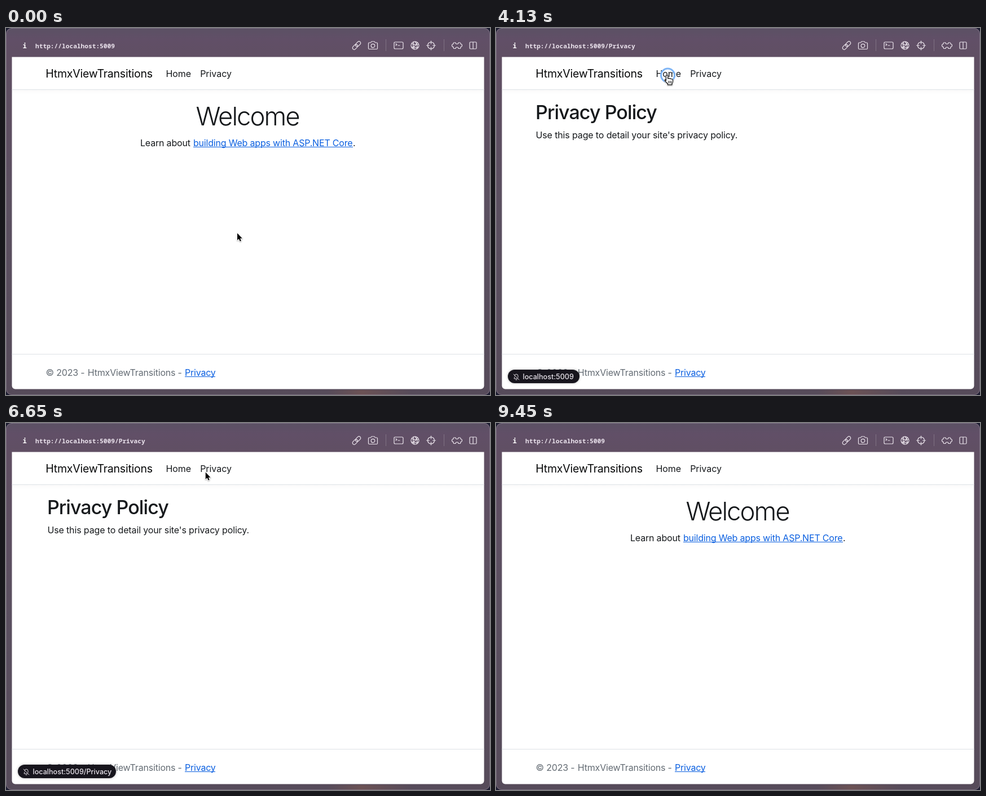
Recreate the animation shown at these times as an HTML page with a canvas. Size 858x652 px, loop 9.66 s.

```html
<!DOCTYPE html>
<html lang="en">
<head>
<meta charset="utf-8">
<title>View transitions</title>
<style>
html, body { margin: 0; width: 100%; height: 100%; overflow: hidden; background: #5d5063; }
canvas { display: block; }
</style>
</head>
<body>
<canvas id="stage" width="858" height="652"></canvas>
<script>
const ctx = document.getElementById('stage').getContext('2d');
const W = 858, H = 652, LOOP = 9660, STEP = 70;
const SANS = 'Inter, "Liberation Sans", sans-serif';
const MONO = '"Noto Sans Mono", "DejaVu Sans Mono", monospace';
const INK = '#15181b', LINK = '#0a5fe0', LINE = '#dee2e6';

// Times at which the page content is exchanged
const swaps = [
  { at: 2774, from: 'home', to: 'privacy' },
  { at: 4290, from: 'privacy', to: 'home' },
  { at: 6185, from: 'home', to: 'privacy' },
  { at: 8010, from: 'privacy', to: 'home' },
];
const clicks = [2610, 4130, 6020, 7850];
const handTimes = [[2170, 2774], [3570, 4290], [5950, 6185], [7070, 8010]];
const hints = [
  { from: 2870, to: 4130, text: 'localhost:5009/Privacy', width: 174 },
  { from: 4130, to: 5180, text: 'localhost:5009', width: 127 },
  { from: 6300, to: 7350, text: 'localhost:5009/Privacy', width: 174 },
  { from: 7350, to: 8470, text: 'localhost:5009', width: 127 },
];
// Pointer stops: time, x, y
const stops = [
  [0, 409, 363], [770, 409, 363], [1190, 376, 366], [1680, 376, 366],
  [2240, 382, 77], [2590, 381, 76], [3290, 381, 76], [3570, 303, 84],
  [5110, 303, 84], [5320, 308, 112], [5530, 304, 118], [5810, 304, 118],
  [5950, 373, 87], [6580, 373, 87], [6790, 295, 83], [7280, 295, 83],
  [7560, 295, 84], [8330, 295, 84], [8610, 300, -24], [LOOP, 300, -24],
];

const clamp = v => Math.min(1, Math.max(0, v));
const mix = (a, b, k) => a + (b - a) * k;
const within = (t, [a, b]) => t >= a && t < b;

function bezier(x1, y1, x2, y2) {
  const axis = (a, b, s) => 3 * a * s * (1 - s) ** 2 + 3 * b * s * s * (1 - s) + s ** 3;
  return x => {
    x = clamp(x);
    let lo = 0, hi = 1;
    for (let i = 0; i < 24; i++) {
      const mid = (lo + hi) / 2;
      if (axis(x1, x2, mid) < x) lo = mid; else hi = mid;
    }
    return axis(y1, y2, (lo + hi) / 2);
  };
}
const slideEase = bezier(0.4, 0, 0.2, 1);
const fadeOut = bezier(0.4, 0, 1, 1);
const fadeIn = bezier(0, 0, 0.2, 1);

function text(str, x, y, { size = 16, weight = 400, color = INK, font = SANS, track = -0.012, align = 'left' } = {}) {
  ctx.font = `${weight} ${size}px ${font}`;
  ctx.letterSpacing = `${track * size}px`;
  ctx.textAlign = align;
  ctx.fillStyle = color;
  ctx.fillText(str, x, y);
}

function rect(x, y, w, h, color) {
  ctx.fillStyle = color;
  ctx.fillRect(x, y, w, h);
}

function rounded(x, y, w, h, r) {
  ctx.beginPath();
  ctx.roundRect(x, y, w, h, r);
}

function link(str, x, y, width) {
  text(str, x, y, { color: LINK });
  rect(x, Math.floor(y) + 2, width, 1, LINK);
}

function strokePath(d, x, y) {
  ctx.save();
  ctx.translate(x, y);
  ctx.stroke(new Path2D(d));
  ctx.restore();
}

function drawFrame() {
  rect(0, 0, W, H, '#1c1c30');
  rounded(0, 0, W, H, 10);
  const shade = ctx.createLinearGradient(0, 0, 0, H);
  shade.addColorStop(0, '#5b5164');
  shade.addColorStop(0.03, '#614f67');
  shade.addColorStop(0.08, '#604f63');
  shade.addColorStop(0.5, '#5b5060');
  shade.addColorStop(1, '#564b5a');
  ctx.fillStyle = shade;
  ctx.fill();
  const glow = ctx.createLinearGradient(570, 0, 720, 0);
  glow.addColorStop(0, 'rgba(116,84,82,0)');
  glow.addColorStop(0.4, 'rgba(116,84,82,.7)');
  glow.addColorStop(1, 'rgba(116,84,82,0)');
  rect(570, 643, 150, 9, glow);
  rounded(0.5, 0.5, W - 1, H - 1, 10);
  ctx.strokeStyle = 'rgba(160,148,165,.5)';
  ctx.lineWidth = 1;
  ctx.stroke();
}

function drawToolbar(url) {
  const pale = '#ece5ed';
  text('i', 29.5, 35.5, { size: 12.5, weight: 700, color: '#fff', font: MONO, track: 0 });
  text(url, 52, 35.5, { size: 11.2, weight: 600, color: '#ebe3ed', font: MONO, track: 0 });
  rect(673, 20, 1, 21, 'rgba(255,255,255,.2)');
  rect(776, 20, 1, 21, 'rgba(255,255,255,.2)');
  ctx.strokeStyle = pale;
  ctx.lineWidth = 1.2;
  ctx.lineCap = ctx.lineJoin = 'round';

  ctx.save();
  ctx.translate(621.5, 31);
  ctx.rotate(-Math.PI / 4);
  rounded(-9, -3, 10.5, 6, 3);
  ctx.stroke();
  rounded(-1.5, -3, 10.5, 6, 3);
  ctx.stroke();
  ctx.restore();

  strokePath('M-8-3.5Q-8-5-6.5-5H-4L-2.5-7H2.5L4-5H6.5Q8-5 8-3.5V5Q8 6.5 6.5 6.5H-6.5Q-8 6.5-8 5ZM3.3.6A3.3 3.3 0 1 1-3.3.6A3.3 3.3 0 1 1 3.3.6', 650.5, 31);
  strokePath('M-6-6H6Q8-6 8-4V4Q8 6 6 6H-6Q-8 6-8 4V-4Q-8-6-6-6ZM-5-3L-3-1.5L-5 0M-1 0H2', 696, 31);
  strokePath('M7 0A7 7 0 1 1-7 0A7 7 0 1 1 7 0M-6-3.5Q0 0 6.5-2M-6.5 2.5Q0 5 6 3M-2-6.7Q-5 1-1 6.8M0-7Q6-1 3 6.2M-5 5Q1 1 4.5-5.3', 725, 31);
  strokePath('M6 0A6 6 0 1 1-6 0A6 6 0 1 1 6 0M0-8V-3M0 8V3M-8 0H-3M8 0H3', 753.5, 31);
  strokePath('M-5.5-5H-2.5Q-2.5-2.5 0-2.5T2.5-5H5.5Q6.5-5 6.5-3V-2.5Q9-2.5 9 0T6.5 2.5V3Q6.5 5.5 5 5.5H2.5Q2.5 3 0 3T-2.5 5.5H-5Q-6.5 5.5-6.5 3V2.5Q-9 2.5-9 0T-6.5-2.5V-3Q-6.5-5-5.5-5Z', 799.5, 31);
  strokePath('M-4.5-6H4.5Q6-6 6-4.5V4.5Q6 6 4.5 6H-4.5Q-6 6-6 4.5V-4.5Q-6-6-4.5-6ZM0-6V6', 828, 31);
}

const pages = {
  home() {
    text('Welcome', 428, 173, { size: 45.5, weight: 300, track: -0.044, align: 'center' });
    text('Learn about', 238, 209.5);
    link('building Web apps with ASP.NET Core', 332, 209.5, 283);
    text('.', 615, 209.5);
  },
  privacy() {
    text('Privacy Policy', 70, 162, { size: 34, weight: 500, track: -0.027 });
    text("Use this page to detail your site's privacy policy.", 70.5, 196, { track: -0.0085 });
  },
};

function drawPage(name, dx, alpha) {
  if (alpha <= 0) return;
  ctx.save();
  ctx.globalAlpha = alpha;
  ctx.translate(dx, 0);
  pages[name]();
  ctx.restore();
}

function drawContent(t, swap) {
  ctx.save();
  rounded(10.5, 51.5, 837, 590, [0, 0, 6, 6]);
  ctx.fillStyle = '#fff';
  ctx.fill();
  ctx.clip();

  const shadow = ctx.createLinearGradient(0, 110, 0, 118);
  shadow.addColorStop(0, 'rgba(0,0,0,.02)');
  shadow.addColorStop(1, 'rgba(0,0,0,0)');
  rect(10, 110, 838, 8, shadow);
  rect(10, 109, 838, 1, LINE);
  text('HtmxViewTransitions', 70.3, 88, { size: 19.5, color: '#060708' });
  text('Home', 283.4, 86.5, { track: -0.003 });
  text('Privacy', 344.2, 86.5, { track: -0.003 });

  if (swap) {
    const age = t - swap.at, slide = 90 * slideEase(age / 600);
    drawPage(swap.from, -slide, 1 - fadeOut(age / 180));
    drawPage(swap.to, 90 - slide, fadeIn((age - 90) / 420));
  } else {
    drawPage('home', 0, 1);
  }

  rect(10, 579, 838, 1, LINE);
  const muted = { color: '#646c74' };
  text('© 2023 -', 70.5, 617.5, muted);
  text('HtmxViewTransitions -', 144.8, 617.5, muted);
  link('Privacy', 317, 617.5, 54);
  ctx.restore();
}

function drawHint({ text: label, width }) {
  ctx.save();
  ctx.shadowColor = 'rgba(0,0,0,.3)';
  ctx.shadowBlur = 4;
  rounded(21, 607, width, 24, 12);
  ctx.fillStyle = '#17151d';
  ctx.fill();
  ctx.restore();
  ctx.strokeStyle = '#dcd7df';
  ctx.lineWidth = 1;
  strokePath('M-5-5L5 5M-3-2Q-3-5 0-5T3-2V1M-3 0L-4 3H2M-1 5H1', 36, 620);
  text(label, 47.5, 623.7, { size: 12.6, weight: 500, color: '#ebe6ee', track: 0 });
}

function drawClick(age, x, y) {
  if (age < 0 || age > 350) return;
  ctx.save();
  ctx.globalAlpha = 1 - clamp((age - 150) / 200);
  ctx.strokeStyle = '#80b6f6';
  ctx.lineWidth = 3;
  ctx.beginPath();
  ctx.arc(x + 1.5, y, mix(12, 27.5, clamp(age / 140)), 0, 7);
  ctx.stroke();
  ctx.restore();
}

const arrow = new Path2D('M1 1.5V14L3.8 11.4L5.8 15.9L7.9 15L6 10.7H9.8Z');
const hand = new Path2D('M-1.6 9.5V1Q-1.5-.6 0-.6T1.7 1V6Q2.4 4.9 4.4 6Q5.6 5.2 7.2 6.6Q10.2 6 10.6 8.6Q11 12 9 14.8V16.8H1.4V15Q-1.5 12.4-3.6 9.6Q-4.4 8.2-3.2 7.8Q-2.4 7.6-1.6 9.5Z');
const knuckles = new Path2D('M2.8 10.3V14M5.2 10.3V14M7.5 10.3V14');

function drawPointer(x, y, isHand) {
  ctx.save();
  ctx.translate(x, y);
  ctx.lineJoin = 'round';
  ctx.shadowColor = 'rgba(0,0,0,.3)';
  ctx.shadowBlur = 2;
  ctx.shadowOffsetY = 1;
  ctx.fillStyle = '#fff';
  ctx.strokeStyle = '#fff';
  ctx.lineWidth = isHand ? 2.4 : 2;
  const shape = isHand ? hand : arrow;
  ctx.stroke(shape);
  ctx.shadowColor = 'transparent';
  ctx.strokeStyle = '#000';
  if (isHand) {
    ctx.fill(shape);
    ctx.lineWidth = 1.2;
    ctx.stroke(shape);
    ctx.lineWidth = 0.9;
    ctx.stroke(knuckles);
  } else {
    ctx.fillStyle = '#000';
    ctx.fill(shape);
  }
  ctx.restore();
}

function pointerAt(t) {
  const i = stops.findIndex(s => s[0] > t);
  const [t0, x0, y0] = stops[i - 1], [t1, x1, y1] = stops[i];
  const p = (t - t0) / (t1 - t0), k = p * p * (3 - 2 * p);
  return [mix(x0, x1, k), mix(y0, y1, k)];
}

function render(now) {
  const t = Math.floor((now % LOOP) / STEP) * STEP;
  const swap = swaps.filter(s => s.at <= t).pop();
  const hint = hints.find(h => within(t, [h.from, h.to]));
  const [x, y] = pointerAt(t);

  drawFrame();
  drawToolbar('http://localhost:5009' + (swap && swap.to === 'privacy' ? '/Privacy' : ''));
  drawContent(t, swap);
  if (hint) drawHint(hint);
  clicks.forEach(at => drawClick(t - at, x, y));
  drawPointer(x, y, handTimes.some(span => within(t, span)));
}

const start = performance.now();
function tick() {
  render(performance.now() - start);
  requestAnimationFrame(tick);
}
tick();
</script>
</body>
</html>
```
